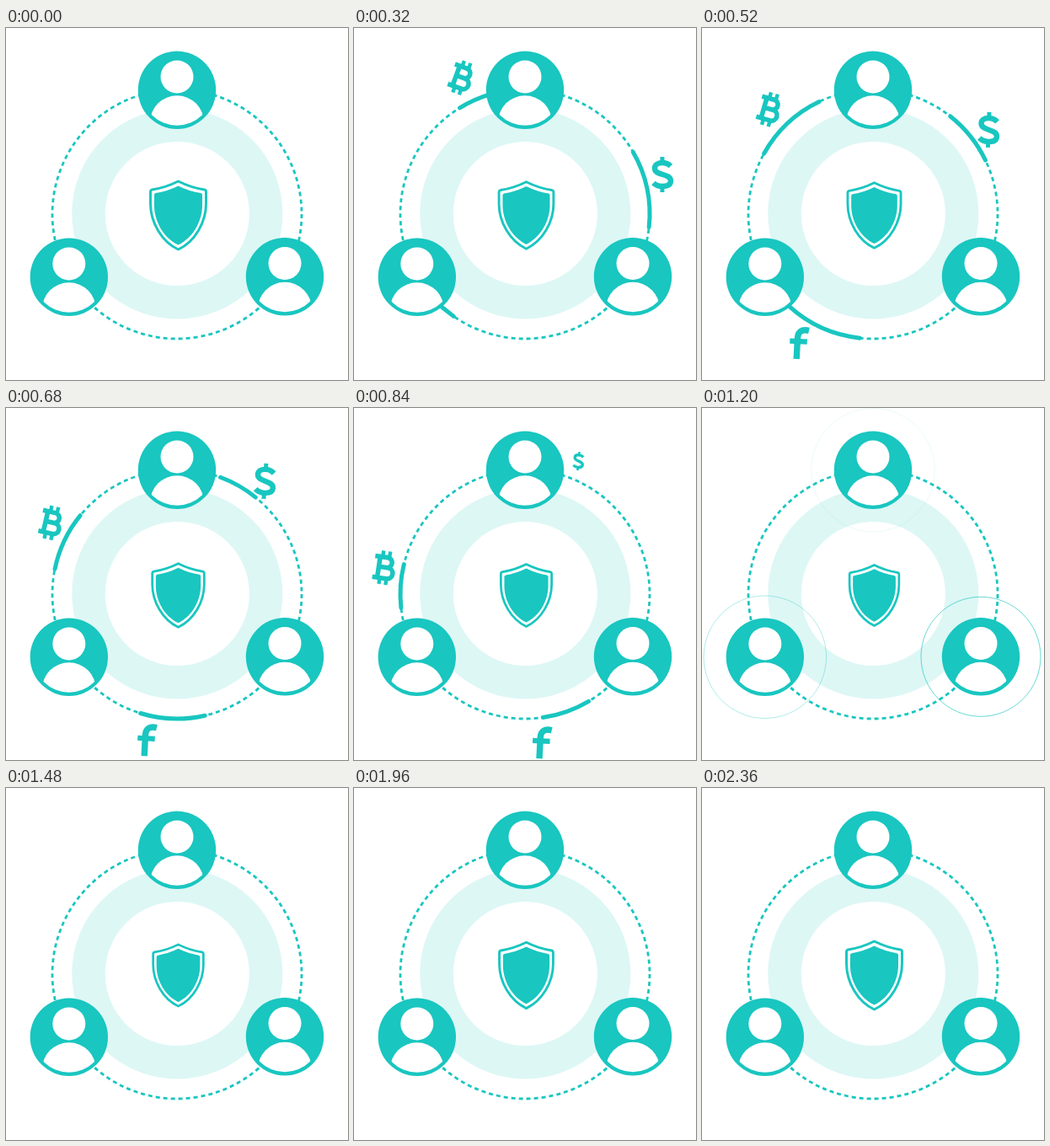
Animation of 406 by 418 pixels, one loop 2400 ms. Source, as an HTML page:

```html
<!DOCTYPE html>
<html lang="en">
<head>
<meta charset="utf-8">
<title>Shield network</title>
<style>
  html, body { margin: 0; width: 100%; height: 100%; overflow: hidden; background: #fff; }
  svg { display: block; width: 100vw; height: 100vh; }
</style>
</head>
<body>
<svg viewBox="0 0 406 418" fill="none" stroke-linecap="butt">
  <defs>
    <clipPath id="inside"><circle r="42"/></clipPath>
    <g id="person">
      <circle r="46.2" fill="#19c6c0"/>
      <circle cy="-15.8" r="19.5" fill="#fff"/>
      <circle cy="38.5" r="32" fill="#fff" clip-path="url(#inside)"/>
    </g>
    <path id="crest" d="M0-40.5Q-15-33-31-30.500Q-33-30-33-28V-14C-33 8-20 31 0 40.500C20 31 33 8 33-14V-28Q33-30 31-30.500Q15-33 0-40.500Z"/>
  </defs>
  <circle cx="203.300" cy="220.500" r="105.300" stroke="#ddf7f5" stroke-width="39.500"/>
  <circle cx="203" cy="221" r="148" stroke="#19c6c0" stroke-width="2.800" stroke-dasharray="5 4.030"/>
  <g id="arcs" stroke="#19c6c0" stroke-width="5" stroke-linecap="round"></g>
  <g id="rings" stroke="#19c6c0"></g>
  <use href="#person" x="203" y="73.700"/>
  <use href="#person" x="74.800" y="295.700"/>
  <use href="#person" x="331" y="295.300"/>
  <g id="icons" stroke="#19c6c0"></g>
  <g id="shield">
    <use href="#crest" stroke="#19c6c0" stroke-width="3" stroke-linejoin="round"/>
    <use href="#crest" fill="#19c6c0" transform="scale(.865)"/>
  </g>
</svg>
<script>
const LOOP = 2400, CX = 203, CY = 221, R = 148;
const $ = id => document.getElementById(id);
const clamp = (v, a = 0, b = 1) => Math.min(b, Math.max(a, v));
const span = (t, a, b) => clamp((t - a) / (b - a));

// Straight segments between [time, value] points; the end segments extend.
function track(points, t) {
  let i = 1;
  while (i < points.length - 1 && t > points[i][0]) i++;
  const [t0, v0] = points[i - 1], [t1, v1] = points[i];
  return v0 + (v1 - v0) * (t - t0) / (t1 - t0);
}

function polar(deg, r) {
  const a = deg * Math.PI / 180;
  return [CX + r * Math.cos(a), CY - r * Math.sin(a)];
}

function add(parent, tag, attrs) {
  const el = document.createElementNS("http://www.w3.org/2000/svg", tag);
  set(el, attrs);
  return parent.appendChild(el);
}

function set(el, attrs) {
  for (const k in attrs) el.setAttribute(k, attrs[k]);
}

const headTrack = [[80, 0], [320, 31.4], [510, 59.7], [680, 78.3], [1000, 114]];

// from: start angle; lead: arc time offset; spin/radius/angle: icon tracks
const movers = [
  {
    from: -30, lead: 190, ring: 866, at: [203, 73.7], show: [40, 180], hide: [760, 930],
    angle: [[320, 46], [680, 82]], radius: [[320, 169.6], [680, 170]], spin: [[320, 0], [680, 4]],
    glyph: [
      [6.4, "M10-10C7-13 3-14 0-14C-6-14-9-11-9-7.500C-9 2 10-2 10 7.500C10 12 6 14 0 14C-4 14-8 12.500-10.500 10"],
      [5, "M0-21V-14M0 14V21"]
    ]
  },
  {
    from: 90, lead: 0, ring: 930, at: [74.8, 295.7], show: [150, 300], hide: [880, 1060],
    angle: [[320, 24.8], [680, 60.3], [1000, 98.2]],
    radius: [[320, 178.5], [680, 171.5], [1000, 167.7]],
    spin: [[320, 20], [680, 13], [1000, 4]],
    glyph: [
      [5.6, "M-13-12.500H2A6 6 0 0 1 2-.5H-6M2-.5H4A6.500 6.500 0 0 1 4 12.500H-13M-7-12.500V12.500"],
      [4.4, "M-4-20V-12M4-20V-12M-4 12V20M4 12V20"]
    ]
  },
  {
    from: 210, lead: -50, ring: 993, at: [331, 295.3], show: [330, 480], hide: [940, 1120],
    angle: [[680, 48.2], [1000, 84.5]], radius: [[680, 177], [1000, 178]], spin: [[680, 3], [1000, 3]],
    glyph: [
      [7.4, "M11-15.300C2-17-2-13-2-6V19"],
      [6.2, "M-11-2H9.500"]
    ]
  }
];

for (const m of movers) {
  m.arcEl = add($("arcs"), "path", {});
  m.ringEl = add($("rings"), "circle", { cx: m.at[0], cy: m.at[1] });
  m.iconEl = add($("icons"), "g", {});
  for (const [width, d] of m.glyph) add(m.iconEl, "path", { d, "stroke-width": width });
}

function drawArc(m, t) {
  const local = t + m.lead;
  const head = clamp(track(headTrack, local), 0, 120);
  const tail = clamp((local - 359) * 0.158, 0, 120);
  const visible = head > tail;
  m.arcEl.style.display = visible ? "" : "none";
  if (!visible) return;
  const a = polar(m.from + tail, R), b = polar(m.from + head, R);
  set(m.arcEl, { d: `M${a}A${R} ${R} 0 0 0 ${b}` });
}

function drawRing(m, t) {
  const p = span(t, m.ring, m.ring + 370);
  m.ringEl.style.display = p > 0 && p < 1 ? "" : "none";
  set(m.ringEl, {
    r: 46 + 27.3 * (1 - (1 - p) ** 3),
    "stroke-width": 0.4 + 1.3 * (1 - p),
    opacity: 1 - p * p
  });
}

function drawIcon(m, t) {
  const size = span(t, ...m.show) * (1 - span(t, ...m.hide));
  m.iconEl.style.display = size > 0 ? "" : "none";
  const [x, y] = polar(m.from + track(m.angle, t), track(m.radius, t));
  set(m.iconEl, { transform: `translate(${x} ${y}) rotate(${track(m.spin, t)}) scale(${size})` });
}

function draw(t) {
  for (const m of movers) {
    drawArc(m, t);
    drawRing(m, t);
    drawIcon(m, t);
  }
  const pulse = 1 - 0.055 * (1 - Math.cos(2 * Math.PI * t / LOOP));
  set($("shield"), { transform: `translate(204.500 222.500) scale(${pulse})` });
}

const start = performance.now();
function tick() {
  draw((performance.now() - start) % LOOP);
  requestAnimationFrame(tick);
}
tick();
</script>
</body>
</html>
```
